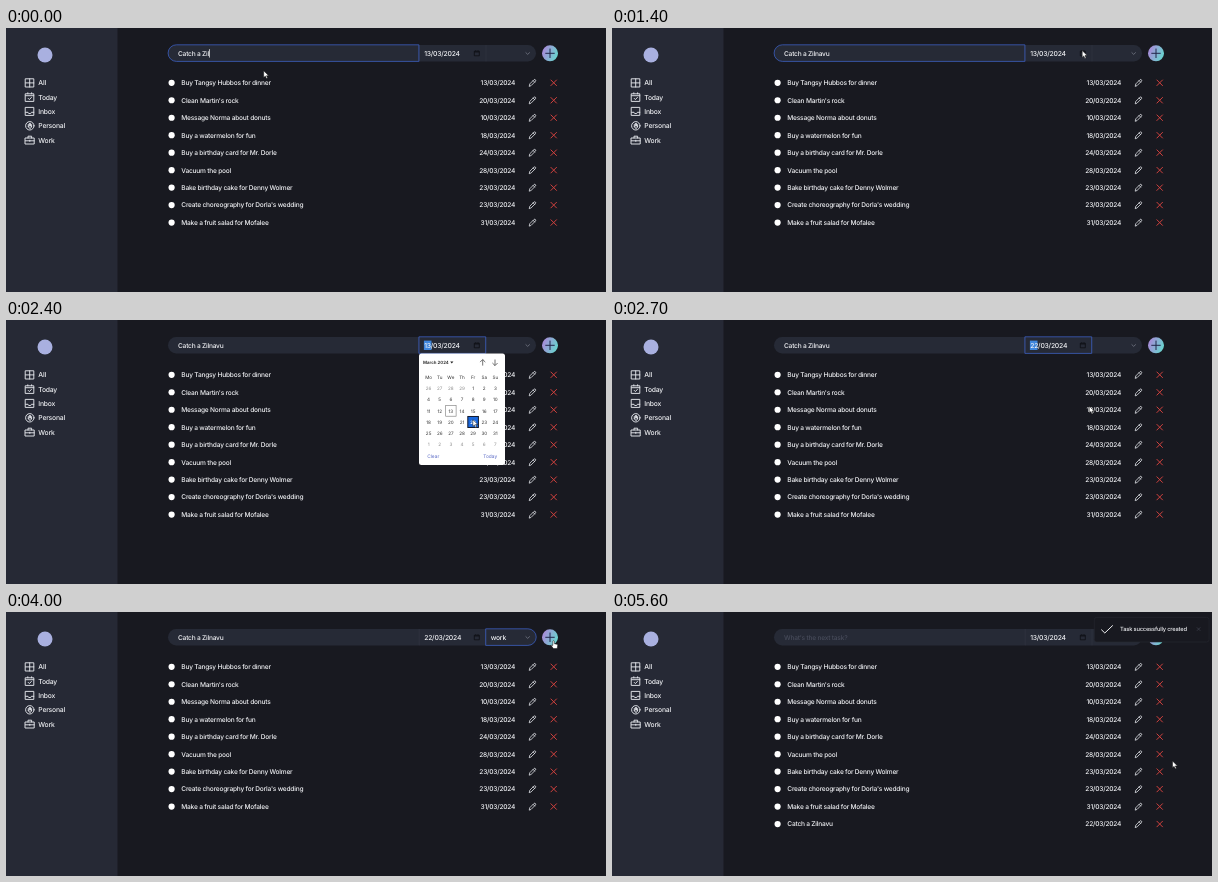
An HTML page for the animation above (5900 ms loop, 600 by 264 pixels).

```html
<!DOCTYPE html>
<html lang="en">
<head>
<meta charset="utf-8">
<title>Task list</title>
<style>
  html, body { margin: 0; width: 100%; height: 100%; overflow: hidden; background: #181920; }
  svg { display: block; width: 100vw; height: 100vh; }
  text {
    font: 500 6.6px Inter, Roboto, sans-serif; letter-spacing: -.033em;
    fill: #f1f2f5; text-rendering: geometricPrecision; white-space: pre;
  }
  .nav text, .field { font-size: 6.8px; }
  .icon { fill: none; stroke: #e3e5ea; stroke-width: .95; stroke-linecap: round; stroke-linejoin: round; }
  .cross { fill: none; stroke: #d0413e; stroke-width: 1; stroke-linecap: round; }
  .focus { fill: none; stroke: #3c5fc0; stroke-width: .8; }
  .hint { fill: #474b5a; }
  .cal text { font-size: 4.6px; font-weight: 400; letter-spacing: 0; fill: #333; text-anchor: middle; }
  .cal .out { fill: #8b8b8b; }
  .cal .head { font-size: 4.4px; font-weight: 600; text-anchor: start; fill: #222; }
  .cal .link { font-size: 4.8px; fill: #5666c4; }
  .cal .on { fill: #fff; font-weight: 700; }
  .toast text { font-size: 5.75px; }
</style>
</head>
<body>
<svg viewBox="0 0 600 264" preserveAspectRatio="none">
  <defs>
    <linearGradient id="mix" x1="0" y1=".3" x2="1" y2=".7">
      <stop offset=".1" stop-color="#a48fd8"/>
      <stop offset=".9" stop-color="#6cd0cf"/>
    </linearGradient>
  </defs>
  <rect width="600" height="264" fill="#181920"/>
  <rect width="111.5" height="264" fill="#262935"/>
  <circle cx="39" cy="27" r="7.5" fill="#a9b0e0"/>

  <g class="nav">
    <g class="icon">
      <path d="M19.6 50.8h8.2v8.2h-8.2zM23.7 50.8V59M19.6 54.9h8.2"/>
      <path d="M19.6 65.8h8.2v7.6h-8.2zM19.6 67.7h8.2M21.8 64.8v1M25.6 64.8v1M22.2 70.4l1.2 1.2 2-2.2"/>
      <path d="M19.6 79.4h8.2v8h-8.2zM19.6 84.3H22l.7 1.2h2l.7-1.2h2.4"/>
      <circle cx="23.8" cy="97.8" r="4.2"/>
      <path d="M22.3 98.5v-2M23.4 98v-2.6M24.5 98v-2.4M25.6 98.4v-1.8M22.3 98.6q.6 1.8 1.8 1.8t1.5-2"/>
      <path d="M19.4 110h8.8v6h-8.8zM22 110v-1.8h3.6v1.8M19.4 112.8h8.8M23.8 112.2v1.2"/>
    </g>
    <text x="32.3" y="57.3">All</text>
    <text x="32.3" y="71.6">Today</text>
    <text x="32.3" y="85.9">Inbox</text>
    <text x="32.3" y="100.3">Personal</text>
    <text x="32.3" y="114.6">Work</text>
  </g>

  <g id="rows"></g>

  <rect x="162" y="17" width="368" height="16.4" rx="8.2" fill="#262a36"/>
  <path d="M413.2 17v16.4M480 17v16.4" stroke="#343846" stroke-width=".6"/>
  <path id="inputFocus" class="focus" d="M412.9 16.8H170.4a8.3 8.3 0 0 0 0 16.6H412.9z"/>
  <path id="dateFocus" class="focus" d="M412.9 16.8h66.8v16.6H412.9z"/>
  <path id="listFocus" class="focus" d="M479.7 16.8h42.2a8.3 8.3 0 0 1 0 16.6h-42.2z"/>
  <text id="task" x="172" y="27.7"></text>
  <path id="caret" d="M0 21.2v8.4" stroke="#fff" stroke-width=".7"/>
  <rect id="mark" x="417.9" y="20.6" width="7.6" height="9.4" fill="#3f86dc"/>
  <text id="date" class="field" x="418.2" y="27.7"></text>
  <path d="M468.3 23.2h5v4.6h-5zM468.3 24h5M469.6 22.4v.8M472 22.4v.8" fill="none" stroke="#0d0e13" stroke-width=".8"/>
  <text id="tag" class="field" x="484.7" y="27.8">work</text>
  <path d="M519.6 24.4l2.1 2 2.1-2" fill="none" stroke="#757987" stroke-width=".8"/>
  <circle cx="544" cy="25.3" r="8" fill="url(#mix)"/>
  <path d="M539.7 25.3h8.6M544 21v8.6" stroke="#23264a" stroke-width="1" stroke-linecap="round"/>

  <g id="menu">
    <path d="M480 33.6h50V57a2 2 0 0 1-2 2h-46a2 2 0 0 1-2-2z" fill="#272a37"/>
    <text x="485" y="40.1">work</text>
    <text x="485" y="48.3">personal</text>
    <text x="485" y="56.7">university</text>
  </g>

  <g id="cal" class="cal">
    <rect x="413" y="33.6" width="86" height="111.4" rx="2.5" fill="#fff"/>
    <text class="head" x="417" y="44">March 2024</text>
    <path d="M444.2 41.6h3.2l-1.6 2z" fill="#222"/>
    <path d="M476.7 45.6v-6M474.1 42.1l2.6-2.6 2.6 2.6M489 39.5v6M486.4 43l2.6 2.6 2.6-2.6" fill="none" stroke="#444" stroke-width=".75"/>
    <rect id="today" x="439.7" y="85.4" width="10.4" height="10.8" fill="none" stroke="#777" stroke-width=".6"/>
    <rect id="pick" width="10.6" height="11" fill="#1967dc"/>
    <g id="days"></g>
    <text class="link" x="427.2" y="138.1">Clear</text>
    <text class="link" x="484.2" y="138.1">Today</text>
  </g>

  <g id="toast" class="toast">
    <rect x="482.3" y="5.3" width="114.8" height="24.7" rx="2.5" fill="#181920" stroke="#272932" stroke-width=".6"/>
    <path d="M489.3 17.6l3.5 3.4 8-7.6" fill="none" stroke="#f2f3f5" stroke-width="1"/>
    <text x="508" y="19.3">Task successfully created</text>
    <path d="M584.9 15.4l3.4 3.4M588.3 15.4l-3.4 3.4" stroke="#454956" stroke-width=".6"/>
  </g>

  <g id="pointer" stroke="#111" stroke-width=".5" fill="#fff" stroke-linejoin="round">
    <path id="arrow" d="M0 0v6.8l1.6-1.5 1.1 2.5 1.2-.5-1.1-2.4h2.2z"/>
    <path id="hand" d="M-.8.6q.8-1 1.5 0v2.5l2.7.6q.9.3.7 1.3L3.6 8H-.2L-2.4 5q.1-1.1 1.6-.2z"/>
  </g>
</svg>
<script>
const LOOP = 5900, STEP = 100;
const $ = id => document.getElementById(id);
const show = (id, on) => { $(id).style.display = on ? '' : 'none'; };
const within = (t, a, b) => t >= a && t < b;
const NEW_TASK = 'Catch a Zilnavu';

// Moments of the story, in ms
const OPEN_CAL = 1500, PICK = 2300, CLOSE_CAL = 2500;
const OPEN_MENU = 3200, CHOOSE = 3600, SUBMIT = 4200, DONE = 4400;

const tasks = [
  ['Buy Tangsy Hubbos for dinner', 13],
  ["Clean Martin's rock", 20],
  ['Message Norma about donuts', 10],
  ['Buy a watermelon for fun', 18],
  ['Buy a birthday card for Mr. Dorle', 24],
  ['Vacuum the pool', 28],
  ['Bake birthday cake for Denny Wolmer', 23],
  ["Create choreography for Dorla's wedding", 23],
  ['Make a fruit salad for Mofalee', 31],
  [NEW_TASK, 22]
];

$('rows').innerHTML = tasks.map(([name, day], i) => `
  <g id="row${i}" transform="translate(0 ${54.8 + i * 17.47})">
    <circle cx="165.6" cy="0" r="3.1" fill="#fff"/>
    <text x="175.3" y="2.4">${name}</text>
    <text x="509.2" y="2.4" text-anchor="end">${day}/03/2024</text>
    <path class="icon" style="stroke-width:.8" d="M523.3 3.2l.5-2.1 4.2-4.2q.8-.5 1.4.1t.1 1.4l-4.2 4.2zM527.1-2.2l1.6 1.6"/>
    <path class="cross" d="M544.9-2.8l5.6 5.6M550.5-2.8l-5.6 5.6"/>
  </g>`).join('');

// Month grid: starts on Monday 26 February.
const colX = c => 422.6 + c * 11.13;
const rowY = r => 68.5 + r * 11.16;
let cells = ['Mo', 'Tu', 'We', 'Th', 'Fr', 'Sa', 'Su']
  .map((d, c) => `<text x="${colX(c)}" y="58.7">${d}</text>`).join('');
for (let i = 0; i < 42; i++) {
  const n = i - 3;
  const inMonth = n > 0 && n < 32;
  const label = n < 1 ? n + 29 : n > 31 ? n - 31 : n;
  cells += `<text ${inMonth ? `id="d${n}"` : 'class="out"'} x="${colX(i % 7)}" y="${rowY(i / 7 | 0) + 1.7}">${label}</text>`;
}
$('days').innerHTML = cells;

// Pointer stops: time, x, y
const path = [
  [0, 257.7, 42.8], [800, 257.7, 42.8], [1400, 470.2, 22.6], [1700, 470.2, 22.6],
  [2300, 466.8, 99.6], [2500, 466.8, 99.6], [3200, 519.3, 31.8], [3300, 519.3, 31.8],
  [3500, 510, 37], [3600, 510, 37], [4000, 547.6, 28.6], [4400, 547.6, 28.6],
  [5200, 560, 148.6], [5500, 560, 148.6], [5600, 560.5, 149], [LOOP, 560.5, 149]
];

function pointerAt(t) {
  const i = path.findIndex(p => p[0] > t);
  const [t0, x0, y0] = path[i - 1], [t1, x1, y1] = path[i];
  const k = (t - t0) / (t1 - t0);
  const e = k * k * (3 - 2 * k);
  return [x0 + (x1 - x0) * e, y0 + (y1 - y0) * e];
}

function pickDay(n) {
  const i = n + 3, pick = $('pick');
  pick.setAttribute('x', colX(i % 7) - 5.3);
  pick.setAttribute('y', rowY(i / 7 | 0) - 5.5);
  pick.setAttribute('stroke', n === 22 ? '#10182c' : 'none');
  $('d13').classList.toggle('on', n === 13);
  $('d22').classList.toggle('on', n === 22);
  show('today', n !== 13);
}

function draw(t) {
  const sent = t >= DONE;
  const task = $('task');
  task.textContent = sent ? "What's the next task?" : NEW_TASK.slice(0, 11 + Math.min(4, t / STEP));
  task.setAttribute('class', sent ? 'hint' : '');
  $('caret').setAttribute('transform', `translate(${172.5 + task.getComputedTextLength()} 0)`);
  show('caret', t < 700);
  show('inputFocus', t < OPEN_CAL);

  const dateOn = within(t, OPEN_CAL, OPEN_MENU);
  show('dateFocus', dateOn);
  show('mark', dateOn);
  $('date').textContent = (within(t, CLOSE_CAL, DONE) ? 22 : 13) + '/03/2024';
  show('cal', within(t, OPEN_CAL, CLOSE_CAL));
  pickDay(t < PICK ? 13 : 22);

  show('listFocus', within(t, OPEN_MENU, SUBMIT));
  show('menu', within(t, OPEN_MENU, CHOOSE));
  show('tag', within(t, CHOOSE, DONE));

  show('row9', sent);
  $('toast').style.opacity = Math.max(0, Math.min(1, (t - DONE + STEP) / 300));

  const [x, y] = pointerAt(t);
  const onButton = Math.hypot(x - 544, y - 25.3) < 8.5;
  $('pointer').setAttribute('transform', `translate(${x} ${y})`);
  show('hand', onButton);
  show('arrow', !onButton);
}

function tick(now) {
  draw(Math.floor(now % LOOP / STEP) * STEP);
  requestAnimationFrame(tick);
}
draw(0);
requestAnimationFrame(tick);
</script>
</body>
</html>
```
